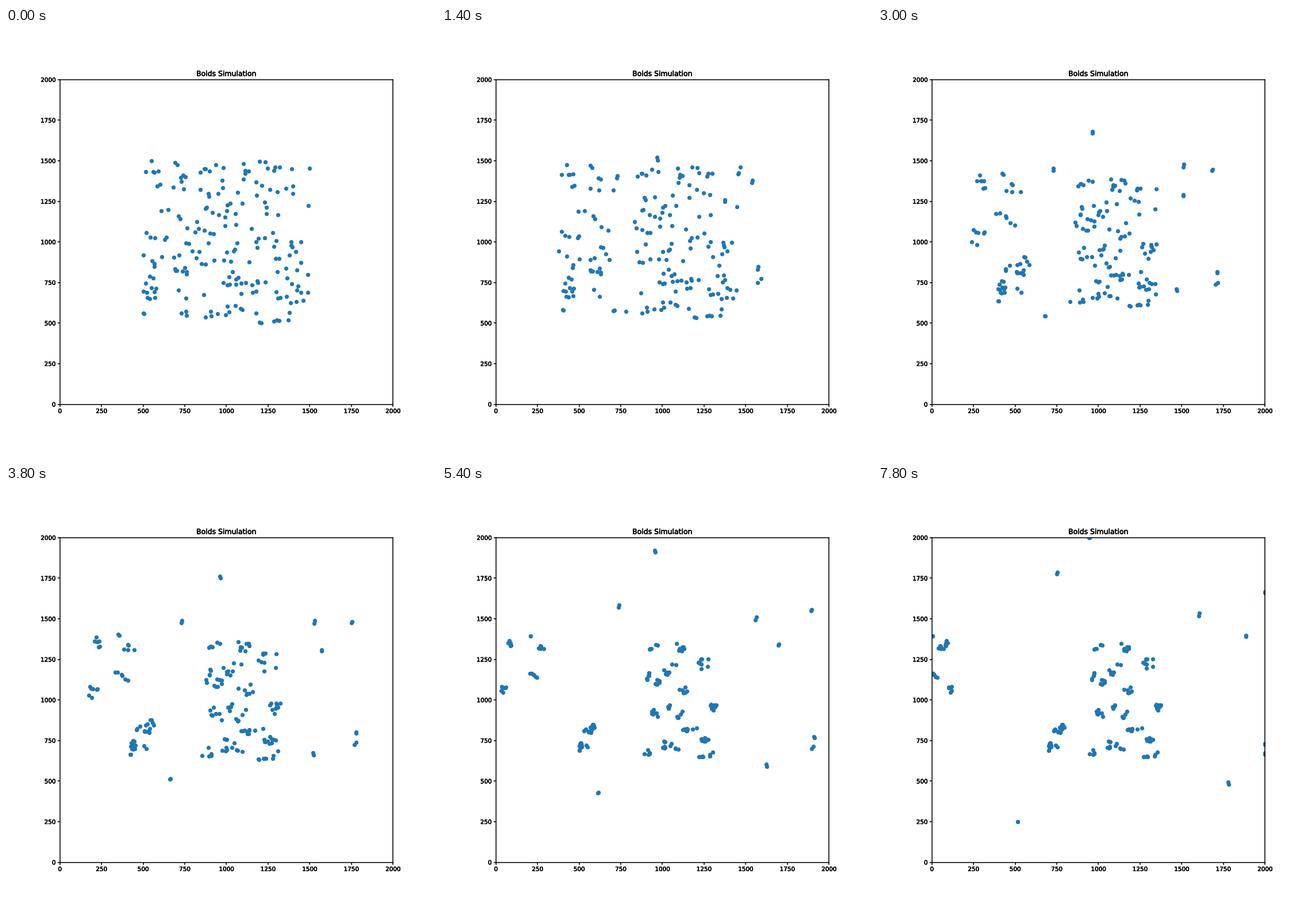
These frames come from a looping animation (748x748 px, 8 s). A matplotlib script:

```python
import numpy as np
import matplotlib.pyplot as plt
from matplotlib.animation import FuncAnimation
from matplotlib.patheffects import withStroke

FRAMES, INTERVAL = 40, 200
COUNT, WORLD = 200, 2000

# Pairs that leave the crowd: start, total travel, power of the easing
RUNAWAYS = [
    (977, 1380, -30, 780, 1),
    (1470, 870, 650, -140, 1),
    (1470, 790, 620, -118, 1),
    (1430, 1300, 680, 360, 1),
    (1390, 1400, 215, 125, 0.6),
    (1280, 1220, 615, 172, 1),
    (1270, 840, 505, -355, 1),
    (720, 1390, 25, 393, 2),
    (700, 600, -192, -345, 2),
]

rng = np.random.default_rng(5)
start = rng.uniform(500, 1500, (COUNT, 2))


def smooth(v):
    v = np.clip(v, 0, 1)
    return v * v * (3 - 2 * v)


def pick_pairs():
    """The two nearest free boids run away from each starting point."""
    free = np.ones(COUNT, bool)
    pairs = []
    for x, y, *_ in RUNAWAYS:
        gap = np.hypot(*(start - (x, y)).T)
        pair = np.argsort(np.where(free, gap, np.inf))[:2]
        free[pair] = False
        pairs.append(pair)
    return pairs, np.flatnonzero(free)


pairs, crowd = pick_pairs()
points = start[crowd]
anchors = points[::6]
gaps = np.linalg.norm(points[:, None] - anchors, axis=2)
home = anchors[gaps.argmin(axis=1)]


def flow(u):
    """Travel of each flock, set by where its home lies."""
    x, y = home.T
    west, low = x < 850, y < 900
    settle = smooth(u / 0.6)
    turning = -870 * u + 900 * u ** 2
    east = -0.26 * (x - 930) * settle + 80 * u ** 3
    dx = np.where(west, np.where(low, turning, -700 * u), east)
    level = np.where(west, np.where(low, 760, 1150), 1000)
    dy = 0.28 * (level - y) * settle
    return np.column_stack([dx, dy])


def positions(frame):
    u = frame / (FRAMES - 1)
    pos = np.empty_like(start)
    grip = 0.8 * smooth(u / 0.7)
    pos[crowd] = points + (home - points) * grip + flow(u)
    # the western flocks bounce off the left wall
    pos[:, 0] = np.where(pos[:, 0] < 0, -0.65 * pos[:, 0], pos[:, 0])
    for pair, (x, y, dx, dy, power) in zip(pairs, RUNAWAYS):
        gap = start[pair] - (x, y)
        tight = gap / np.maximum(1, np.hypot(*gap.T) / 9)[:, None]
        path = np.array([x, y]) + np.array([dx, dy]) * u ** power
        pos[pair] = path + gap + (tight - gap) * smooth(u / 0.25)
    return np.clip(pos, 0, WORLD)


fig, ax = plt.subplots(figsize=(10, 10), dpi=74.8)
fig.subplots_adjust(left=0.1253, right=0.9, bottom=0.125, top=0.88)
ax.set(xlim=(0, WORLD), ylim=(0, WORLD), title="Boids Simulation")
ax.tick_params(width=1.5)
ax.spines[:].set_linewidth(1.5)
heavy = [withStroke(linewidth=0.6, foreground="black")]
for label in [ax.title, *ax.get_xticklabels(), *ax.get_yticklabels()]:
    label.set_path_effects(heavy)
dots = ax.scatter(*positions(0).T, color="#1f77b4")


def update(frame):
    dots.set_offsets(positions(frame))
    return (dots,)


anim = FuncAnimation(fig, update, frames=FRAMES, interval=INTERVAL,
                     repeat=True, repeat_delay=0)
plt.show()
```
